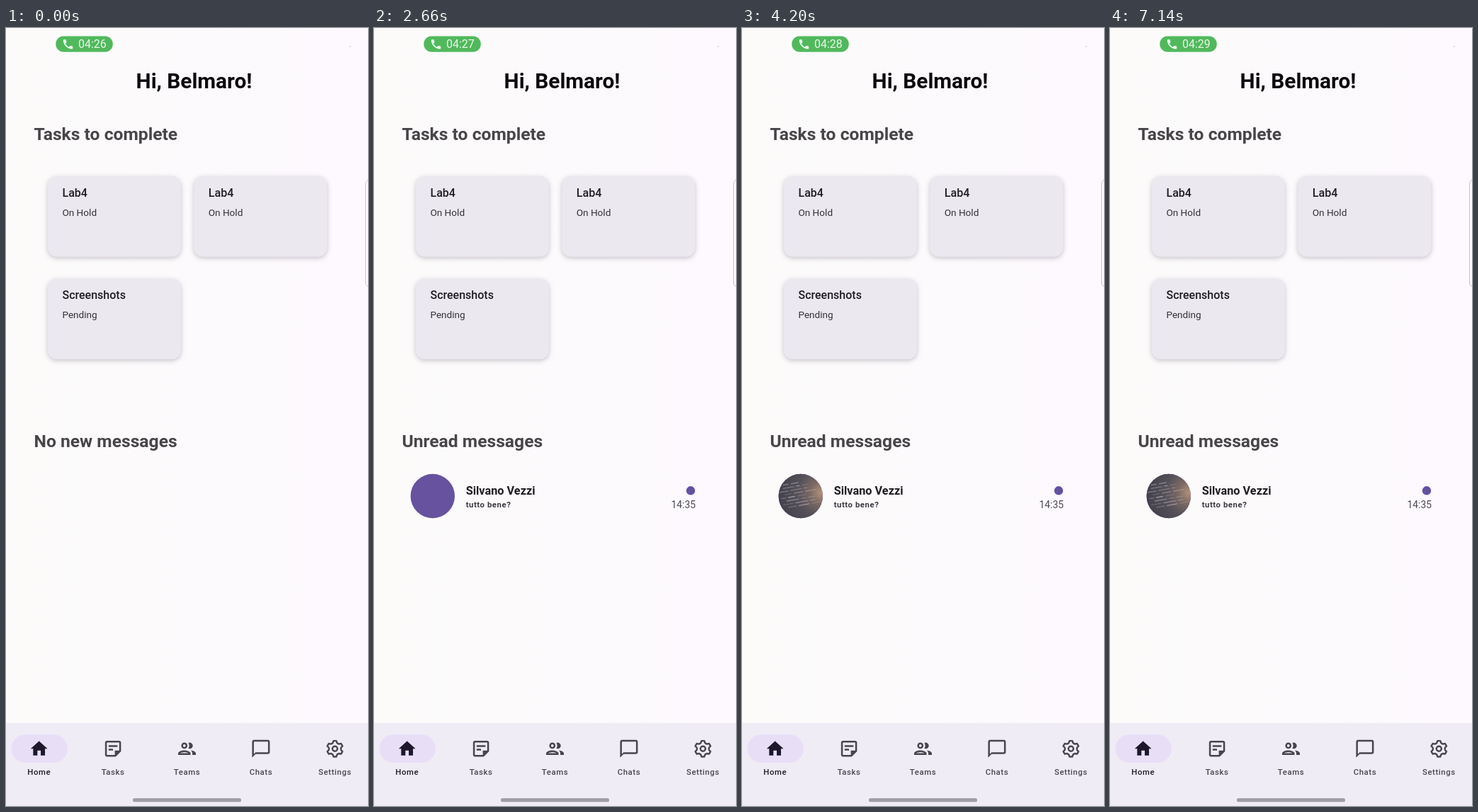
Write an HTML page that moves like this. It is 511 px wide and 1097 px high and loops after 8000 ms.

```html
<!DOCTYPE html>
<html lang="en">
<head>
<meta charset="utf-8">
<title>Task home screen</title>
<style>
html, body { margin: 0; width: 100%; height: 100%; overflow: hidden; background: #fcfafc; }
svg { display: block; width: 100%; height: 100%; }
text { font-family: Roboto, sans-serif; fill: #1f1c23; }
.title { font-size: 29.8px; font-weight: 700; fill: #0b090d; text-anchor: middle; }
.heading { font-size: 24.65px; font-weight: 700; fill: #474549; }
.card-name { font-size: 16px; font-weight: 500; }
.card-state { font-size: 13.6px; fill: #343138; }
.sender { font-size: 16.3px; font-weight: 700; }
.preview { font-size: 11.4px; font-weight: 700; letter-spacing: .53px; fill: #3c3940; }
.time { font-size: 13.8px; fill: #4d4a51; }
.label { font-size: 11.4px; font-weight: 500; letter-spacing: .55px; fill: #4a4650; text-anchor: middle; }
.label.active { fill: #211d27; }
.clock { font-size: 16px; fill: #e9f8ea; }
.card { fill: #ece8f0; filter: drop-shadow(0 2px 3.5px rgba(60, 50, 75, .28)); }
.icon { fill: #49454f; }
.icon.active { fill: #1d192b; }
.gear { fill: none; stroke: #49454f; stroke-width: 1.9; stroke-linejoin: round; }
</style>
</head>
<body>
<svg viewBox="0 0 511 1097" preserveAspectRatio="none">
  <defs>
    <linearGradient id="paper">
      <stop offset="0" stop-color="#fcfbfa"/>
      <stop offset=".55" stop-color="#fcfafc"/>
      <stop offset=".9" stop-color="#fdf9fe"/>
    </linearGradient>
    <radialGradient id="photo" cx=".95" cy=".42" r=".95">
      <stop offset="0" stop-color="#b3917a"/>
      <stop offset=".25" stop-color="#7d6a63"/>
      <stop offset=".55" stop-color="#55505a"/>
      <stop offset="1" stop-color="#42414b"/>
    </radialGradient>
    <linearGradient id="tint" x1="0" y1="0" x2="0" y2="1">
      <stop offset=".5" stop-color="#6750a4" stop-opacity="0"/>
      <stop offset="1" stop-color="#6f58a8" stop-opacity=".75"/>
    </linearGradient>
    <clipPath id="round"><circle cx="82.8" cy="660" r="31.2"/></clipPath>
  </defs>
  <rect width="511" height="1097" fill="url(#paper)"/>

  <rect x="70.3" y="11.5" width="80.5" height="22.3" rx="11.1" fill="#50b95c"/>
  <path transform="translate(78.5 14) scale(.75)" fill="#e9f8ea" d="M20 15.4c-1.2 0-2.4-.2-3.5-.6-.4-.1-.8 0-1 .3L13.9 17c-2.8-1.3-5.5-3.9-6.9-6.8L9 8.5c.3-.3.3-.7.2-1C8.8 6.4 8.6 5.2 8.6 4c0-.5-.4-1-1-1H4.2C3.6 3 3 3.2 3 4c0 9.3 7.7 17 17 17 .7 0 1-.6 1-1.2v-3.4c0-.6-.5-1-1-1z"/>
  <text class="clock" id="clock" x="102" y="28.3"></text>
  <circle cx="486" cy="26" r=".8" fill="#b5b1b8"/>

  <text class="title" x="265.5" y="85.2">Hi, Belmaro!</text>
  <text class="heading" x="39.5" y="158">Tasks to complete</text>
  <g id="cards"></g>
  <rect id="edge" x="507.5" y="213.5" width="90" height="151.5" rx="6" fill="none"/>

  <text class="heading" id="inbox" x="39.5" y="590.5"></text>
  <g id="message">
    <circle cx="82.8" cy="660" r="31.2" fill="#66529f"/>
    <g id="avatar" clip-path="url(#round)">
      <rect x="51" y="628" width="64" height="64" fill="url(#photo)"/>
      <g id="code" transform="rotate(-10 83 660)"></g>
      <rect id="cast" x="51" y="628" width="64" height="64" fill="url(#tint)"/>
    </g>
    <text class="sender" x="129.7" y="657.6">Silvano Vezzi</text>
    <text class="preview" x="129.7" y="675.7">tutto bene?</text>
    <circle cx="447" cy="652.3" r="6.2" fill="#6252a0"/>
    <text class="time" x="419.6" y="677">14:35</text>
  </g>

  <rect y="980" width="511" height="117" fill="#f0ecf6"/>
  <rect x="7.5" y="996" width="79.5" height="40" rx="20" fill="#e8dff7"/>
  <g id="nav"></g>
  <rect x="179" y="1086" width="153" height="5.3" rx="2.6" fill="#a19da7"/>
</svg>
<script>
const NS = 'http://www.w3.org/2000/svg';
const LOOP = 8000;
const $ = id => document.getElementById(id);

function add(parent, tag, attrs, text) {
  const el = document.createElementNS(NS, tag);
  for (const key in attrs) el.setAttribute(key, attrs[key]);
  if (text) el.textContent = text;
  parent.appendChild(el);
  return el;
}

function addCard(x, y, name, state) {
  add($('cards'), 'rect', { class: 'card', x, y, width: 188, height: 113.5, rx: 13 });
  add($('cards'), 'text', { class: 'card-name', x: x + 20.6, y: y + 28.8 }, name);
  add($('cards'), 'text', { class: 'card-state', x: x + 20.5, y: y + 55.8 }, state);
}

addCard(58.9, 209, 'Lab4', 'On Hold');
addCard(265.2, 209, 'Lab4', 'On Hold');
addCard(58.9, 353.5, 'Screenshots', 'Pending');

const icons = {
  Home: 'M10 20v-6h4v6h5v-8h3L12 3 2 12h3v8z',
  Tasks: 'M19 5v9h-5v5H5V5h14m0-2H5c-1.1 0-2 .9-2 2v14c0 1.1.9 2 2 2h10l6-6V5c0-1.1-.9-2-2-2zm-7 11H7v-2h5v2zm5-4H7V8h10v2z',
  Teams: 'M9 13.75c-2.34 0-7 1.17-7 3.5V19h14v-1.75c0-2.33-4.66-3.5-7-3.5zM4.34 17c.84-.58 2.87-1.25 4.66-1.25s3.82.67 4.66 1.25H4.34zM9 12a3.5 3.5 0 1 0 0-7 3.5 3.5 0 0 0 0 7zm0-5a1.5 1.5 0 1 1 0 3 1.5 1.5 0 0 1 0-3zm7.04 6.81c1.16.84 1.96 1.96 1.96 3.44V19h4v-1.75c0-2.02-3.5-3.17-5.96-3.44zM15 12a3.5 3.5 0 1 0-1.5-6.65c1.3 1.9 1.3 4.4 0 6.3.46.22.96.35 1.5.35z',
  Chats: 'M20 2H4c-1.1 0-2 .9-2 2v18l4-4h14c1.1 0 2-.9 2-2V4c0-1.1-.9-2-2-2zm0 14H6l-2 2V4h16v12z'
};

function gearPath() {
  const points = [];
  for (let tooth = 0; tooth < 6; tooth++) {
    for (const [offset, r] of [[-21, 6.9], [-10, 9.1], [10, 9.1], [21, 6.9]]) {
      const a = (tooth * 60 - 90 + offset) * Math.PI / 180;
      points.push((12 + r * Math.cos(a)).toFixed(2) + ' ' + (12 + r * Math.sin(a)).toFixed(2));
    }
  }
  return 'M' + points.join('L') + 'Z';
}

['Home', 'Tasks', 'Teams', 'Chats', 'Settings'].forEach((name, i) => {
  const x = 46.7 + i * 104.4;
  const size = i ? 1.25 : 1.19;
  const active = i ? '' : ' active';
  const g = add($('nav'), 'g', {
    transform: `translate(${x - 12 * size} ${1016.3 - 12 * size}) scale(${size})`
  });
  if (icons[name]) {
    add(g, 'path', { class: 'icon' + active, d: icons[name] });
  } else {
    add(g, 'path', { class: 'gear', d: gearPath() });
    add(g, 'circle', { class: 'gear', cx: 12, cy: 12, r: 2.8 });
  }
  add($('nav'), 'text', { class: 'label' + active, x, y: 1053.2 }, name);
});

// Slanted, uneven strokes suggest a screen full of code.
for (let row = 0; row < 8; row++) {
  let x = 53 + (row * 7) % 13;
  for (let part = 0; part < 3; part++) {
    const width = 5 + (row * 11 + part * 17) % 14;
    add($('code'), 'rect', {
      x, y: 640 + row * 4.6, width, height: 1.1,
      fill: part === 1 ? '#cfc6c2' : '#a9a9b2',
      opacity: 0.35 + ((row + part) % 3) * 0.18
    });
    x += width + 3;
  }
}

const ticks = [420, 2920, 5720];
const show = (id, on) => $(id).setAttribute('visibility', on ? 'inherit' : 'hidden');

function render(t) {
  const seconds = 26 + ticks.filter(at => t >= at).length;
  const unread = t >= 1560;
  $('clock').textContent = '04:' + seconds;
  $('inbox').textContent = unread ? 'Unread messages' : 'No new messages';
  $('edge').setAttribute('stroke', unread ? '#c6bfc9' : '#dcbfc9');
  show('message', unread);
  show('avatar', t >= 3660);
  show('cast', t < 4200);
}

const start = performance.now();
function frame() {
  render((performance.now() - start) % LOOP);
  requestAnimationFrame(frame);
}
frame();
</script>
</body>
</html>
```
